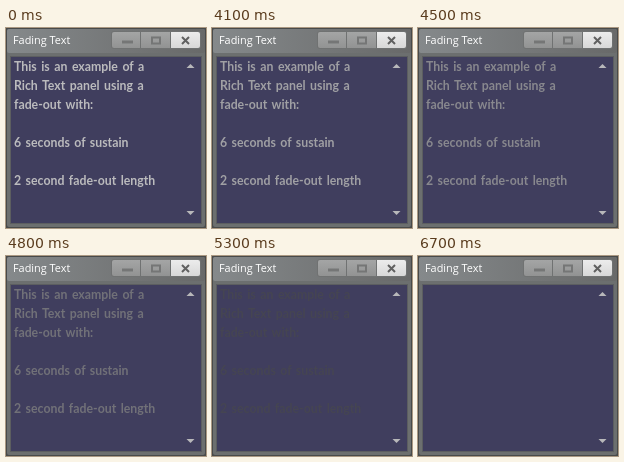
Animation, 200 px wide and 200 px high, one loop 7.5 s. Source, as an HTML page:

```html
<!DOCTYPE html>
<html lang="en">
<head>
<meta charset="utf-8">
<title>Fading Text</title>
<style>
html, body { margin: 0; width: 100%; height: 100%; overflow: hidden; background: #5c5c5c; }
svg { display: block; width: 100vw; height: 100vh; }
.title { font: 10.9px "Open Sans", "Noto Sans", sans-serif; fill: #fff; }
.body { font: bold 12.3px Lato, "Open Sans", sans-serif; word-spacing: 1.5px; white-space: pre; }
</style>
</head>
<body>
<svg viewBox="0 0 200 200">
  <defs>
    <linearGradient id="bar">
      <stop offset="0" stop-color="#85898b"/>
      <stop offset="1" stop-color="#686969"/>
    </linearGradient>
    <linearGradient id="button" x2="0" y2="1">
      <stop offset="0" stop-color="#a4a5a5"/>
      <stop offset="1" stop-color="#929393"/>
    </linearGradient>
    <linearGradient id="close" x2="0" y2="1">
      <stop offset="0" stop-color="#ececec"/>
      <stop offset="1" stop-color="#d8d8d8"/>
    </linearGradient>
  </defs>

  <rect width="200" height="200" fill="#484a4a"/>
  <rect x="1" y="1" width="198" height="198" rx="2" fill="#6c6f6f"/>
  <rect x="1" y="1" width="198" height="24" rx="2" fill="url(#bar)"/>
  <rect x="4" y="28" width="192" height="168" fill="#5c5e60"/>
  <rect x="5" y="29" width="190" height="166" fill="#403e5e"/>
  <text class="title" x="7" y="16">Fading Text</text>

  <rect x="105" y="3" width="90" height="18" rx="3" fill="#707272"/>
  <path d="M108 4H134V20H108Q106 20 106 18V6Q106 4 108 4Z" fill="url(#button)"/>
  <path d="M135 4H164V20H135Z" fill="url(#button)"/>
  <path d="M165 4H192Q194 4 194 6V18Q194 20 192 20H165Z" fill="url(#close)"/>
  <path d="M116 14H127" stroke="#757676" stroke-width="3"/>
  <rect x="146" y="9.5" width="8" height="6" fill="none" stroke="#757676" stroke-width="2"/>
  <path d="M176 9L183 16M183 9L176 16" stroke="#606060" stroke-width="2"/>

  <path d="M180.5 40L184.5 36L188.5 40Z M180.5 183H188.5L184.5 187Z" fill="#b8b8ba"/>
  <g id="message" class="body"></g>
</svg>
<script>
const LOOP = 7500;
const LINE_HEIGHT = 19;
const lines = [
  "This is an example of a",
  "Rich Text panel using a",
  "fade-out with:",
  "",
  "6 seconds of sustain",
  "",
  "2 second fade-out length"
];
// Each colour holds until its end time; afterwards the text is gone.
const fade = [
  [4100, "#bbbbbd"],
  [4500, "#a0a0a4"],
  [4800, "#88888e"],
  [5100, "#717178"],
  [5300, "#5a5a64"],
  [5500, "#454552"]
];
const message = document.getElementById("message");

lines.forEach((line, i) => {
  const text = document.createElementNS("http://www.w3.org/2000/svg", "text");
  text.setAttribute("x", 8);
  text.setAttribute("y", 43 + i * LINE_HEIGHT);
  text.textContent = line;
  message.append(text);
});

function draw(now) {
  const t = now % LOOP;
  const step = fade.find(([end]) => t < end);
  message.setAttribute("fill", step ? step[1] : "none");
}

function tick() {
  draw(performance.now());
  requestAnimationFrame(tick);
}
tick();
</script>
</body>
</html>
```
